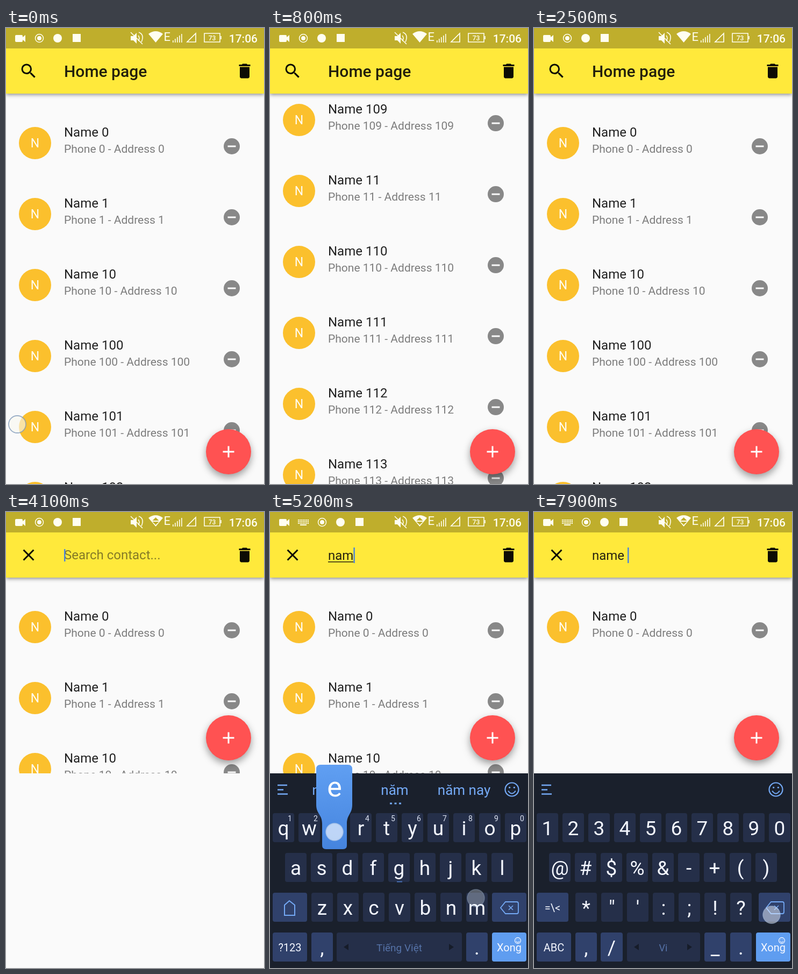
An HTML page with a canvas that plays this animation: 480x848 px, repeating every 8000 ms.

```html
<!DOCTYPE html>
<html lang="vi">
<head>
<meta charset="utf-8">
<title>Contact list search</title>
<style>
html, body { margin: 0; width: 100%; height: 100%; overflow: hidden; background: #fafafa; }
canvas { display: block; }
</style>
</head>
<body>
<canvas id="stage" width="480" height="848"></canvas>
<script>
const LOOP = 8000, TOP = 122, KEYBOARD_TOP = 486;
const c = document.getElementById('stage').getContext('2d');
const BLUE = '#74a9f5', KEY = '#252f49', DARK_KEY = '#30416b';

const ICONS = {
  search: 'M15.5 14h-.79l-.28-.27A6.47 6.47 0 0 0 16 9.5 6.5 6.5 0 1 0 9.5 16c1.61 0 3.09-.59 4.23-1.57l.27.28v.79l5 4.99L20.49 19zm-6 0a4.5 4.5 0 1 1 0-9 4.5 4.5 0 0 1 0 9z',
  close: 'M19 6.41L17.59 5 12 10.59 6.41 5 5 6.41 10.59 12 5 17.59 6.41 19 12 13.41 17.59 19 19 17.59 13.41 12z',
  trash: 'M6 19c0 1.1.9 2 2 2h8c1.1 0 2-.9 2-2V7H6zM19 4h-3.5l-1-1h-5l-1 1H5v2h14z'
};

// Taps: press, release, x, y, popup label, popup centre
const TAPS = [
  [2560, 2680, 31, 83],
  [4770, 4860, 338, 735, 'n', 337, 735],
  [4910, 5000, 46, 668, 'a', 48, 661],
  [5040, 5130, 383, 718, 'm', 385, 735],
  [5180, 5290, 120, 595, 'e', 120, 587],
  [5590, 5690, 240, 818],
  [5730, 5820, 456, 596, 'p', 456, 587],
  [6290, 6410, 447, 726],
  [6450, 6560, 23, 843],
  [7210, 7310, 456, 596, '0', 456, 587],
  [7780, 7890, 442, 749]
];
const TYPED = [[0, ''], [4860, 'n'], [5000, 'na'], [5130, 'nam'], [5290, 'name'], [5690, 'name '],
  [5820, 'name p'], [6410, 'name '], [7310, 'name 0'], [7890, 'name ']];
const SUGGESTIONS = { n: 'nó|nhé|này', na: 'na|nay|nào', nam: 'nam|năm|năm nay', name: 'name|names|named' };

// Contacts sorted as strings: 0, 1, 10, 100 … 109, 11, 110 …
const contacts = Array.from({ length: 200 }, (_, i) => String(i)).sort();

const clamp = v => Math.max(0, Math.min(1, v));

function text(s, x, y, size, color, align = 'left', weight = 400) {
  c.font = `${weight} ${size}px Roboto, sans-serif`;
  c.textAlign = align;
  c.fillStyle = color;
  c.fillText(s, x, y);
}
function rect(x, y, w, h, color) { c.fillStyle = color; c.fillRect(x, y, w, h); }
function disc(x, y, r, color) {
  c.fillStyle = color;
  c.beginPath(); c.arc(x, y, r, 0, 7); c.fill();
}
function box(x, y, w, h, r, color) {
  c.fillStyle = color;
  c.beginPath(); c.roundRect(x, y, w, h, r); c.fill();
}
function fill(d, color) { c.fillStyle = color; c.fill(new Path2D(d)); }
function line(d, color, width) {
  c.strokeStyle = color; c.lineWidth = width;
  c.stroke(new Path2D(d));
}
function withShadow(blur, dy, alpha, draw) {
  c.save();
  c.shadowColor = `rgba(0,0,0,${alpha})`; c.shadowBlur = blur; c.shadowOffsetY = dy;
  draw();
  c.restore();
}
function icon(name, x, y) {
  c.save();
  c.translate(x, y); c.scale(1.5, 1.5);
  fill(ICONS[name], '#0c0c04');
  c.restore();
}

function scrollAt(t) {
  if (t < 1000) return 2158 * (1 - Math.exp(-Math.max(0, t - 100) / 500));
  if (t < 1500) {
    const u = (t - 1000) / 500;
    return 1801 * (1 - 2.59 * u * u + 1.59 * u ** 3);
  }
  const s = t - 1500;
  return t < 2500 ? -1.49 * s * Math.exp(-s / 130) : 0;
}

function drawList(t) {
  const bottom = t < 3700 ? 848 : KEYBOARD_TOP;
  const count = t < 5850 ? contacts.length : t < 7330 ? 0 : 1;
  const scroll = scrollAt(t);
  c.save();
  c.beginPath(); c.rect(0, TOP, 480, bottom - TOP); c.clip();
  for (let i = 0; i < count; i++) {
    const y = 214 + i * 132 - scroll, id = contacts[i];
    if (y < 60 || y > 900) continue;
    disc(54, y, 30, '#fbc02d');
    text('N', 54, y + 8, 23, '#fffdf5', 'center');
    text('Name ' + id, 108, y - 12, 24, '#212121');
    text(`Phone ${id} - Address ${id}`, 108, y + 18, 21, '#7c7c7c');
    disc(420, y + 6, 15, '#888');
    rect(412.5, y + 4.5, 15, 3, '#fafafa');
  }
  c.restore();
}

function drawFab(t) {
  const y = t < 3700 ? 788 : 420;
  withShadow(14, 6, 0.38, () => disc(414, y, 42, '#ff5252'));
  line(`M403.5 ${y}h21M414 ${y - 10.5}v21`, '#fff', 3);
}

function drawStatus(t) {
  const ink = '#fffef0', shift = t < 4300 ? 0 : 35;
  rect(0, 0, 480, 38, '#bfae2c');
  box(17, 13, 14, 13, 2, ink);
  fill('M30 18l6-5v13l-6-5z', ink);
  if (shift) {
    for (let i = 0; i < 21; i++) rect(52 + i % 7 * 3, 14 + (i / 7 | 0) * 3, 2, 2, ink);
    rect(56, 23, 12, 2, ink);
  }
  c.save();
  c.translate(shift, 0);
  disc(62, 19, 4, ink);
  line('M54.5 19a7.5 7.5 0 1 0 15 0a7.5 7.5 0 1 0-15 0', ink, 1.5);
  disc(96, 19, 8, ink);
  rect(124, 11, 15, 15, ink);
  c.restore();

  fill('M232 15h5l6-6v20l-6-6h-5z', ink);
  line('M232 8L254 30M246 14q4 5 0 10M247 8q11 4 5 18', ink, 1.6);
  fill('M265 11Q278.500 1 292 11L278.500 27z', ink);
  if (t >= 3400) {
    fill('M278.500 10l6 6h-12zM272.500 18h12l-6 6z', '#bfae2c');
  }
  text('E', 293.5, 24, 22, ink);
  for (let i = 0; i < 5; i++) rect(310 + i * 4, 23 - i * 3, 1.6, 4 + i * 3, ink);
  line('M337 26H353V10z', ink, 1.7);
  line('M369 10h29v16h-29zM400 15v6', ink, 1.6);
  text('73', 383.5, 22.5, 12, ink, 'center', 500);
  text('17:06', 468, 27, 21, ink, 'right', 500);
}

function drawHeader(t, query) {
  withShadow(7, 2, 0.45, () => rect(0, 30, 480, TOP - 30, '#ffe93b'));
  drawStatus(t);
  const searching = t >= 2750;
  icon(searching ? 'close' : 'search', 24, 62);
  icon('trash', 426, 62);
  if (!searching) return text('Home page', 108, 91, 30, '#221f0c', 'left', 500);
  if (!query) text('Search contact...', 108, 88, 24, '#857a26');
  text(query, 108, 89, 24, '#26230f');
  const width = c.measureText(query).width;
  if (query && !query.includes(' ')) rect(108, 92, width, 1.5, '#26230f');
  rect(108 + width, query ? 66 : 69, 2.5, query ? 29 : 23, '#4f86d8');
}

function smiley(x, y, r, color, width) {
  line(`M${x - r} ${y}a${r} ${r} 0 1 0 ${2 * r} 0a${r} ${r} 0 1 0 ${-2 * r} 0M${x - r * .55} ${y + r * .2}q${r * .55} ${r * .8} ${r * 1.1} 0`, color, width);
  disc(x - r * .35, y - r * .3, r * .13, color);
  disc(x + r * .35, y - r * .3, r * .13, color);
}

function key(x, y, w, label, size = 37, color = KEY) {
  box(x, y, w, 54, 4, color);
  text(label, x + w / 2, y + (size > 30 ? 41 : 35), size, '#f4f7ff', 'center');
}
function keyRow(labels, x, y) {
  [...labels].forEach((label, i) => key(x + i * 48, y, 40, label));
}

function drawKeyboard(t, query) {
  const rise = clamp((t - 4150) / 250);
  if (!rise) return;
  const symbols = t >= 6560;
  c.save();
  c.translate(0, 362 * (1 - rise) ** 2);
  rect(0, KEYBOARD_TOP, 480, 362, '#1a202c');

  line('M14 508h18M14 516.500h11M14 524.500h19', BLUE, 2.6);
  smiley(450, 516, 12.5, BLUE, 2.2);
  const words = SUGGESTIONS[query];
  if (words) {
    words.split('|').forEach((word, i) => text(word, [104, 232, 361][i], 526, 26, BLUE, 'center'));
    for (const x of [225, 233.5, 242]) rect(x - 2, 540.5, 4, 3, BLUE);
  }

  keyRow(symbols ? '1234567890' : 'qwertyuiop', 5, 560);
  keyRow(symbols ? '@#$%&-+()' : 'asdfghjkl', 28, 634);
  keyRow(symbols ? '*"\':;!?' : 'zxcvbnm', 77, 708);
  if (!symbols) {
    for (let i = 0; i < 10; i++) text((i + 1) % 10, 37 + i * 48, 575, 14, '#dfe5f4', 'center');
    rect(236, 686.5, 10, 2, '#4770b5');
  }

  if (symbols) key(5, 708, 59, '=\\<', 20, DARK_KEY);
  else {
    box(5, 708, 64, 54, 4, DARK_KEY);
    line('M27 750V731L36 723L46 731V750z', BLUE, 2);
  }
  box(symbols ? 418 : 413, 708, symbols ? 59 : 64, 54, 4, DARK_KEY);
  const nudge = symbols ? 3 : 0;
  line(`M${429 + nudge} 736l9-11h21q3 0 3 3v16q0 3-3 3h-21z`, BLUE, 1.8);
  line(`M${444 + nudge} 732l8 8m0-8l-8 8`, BLUE, 1.6);

  key(5, 782, 64, symbols ? 'ABC' : '?123', 20, DARK_KEY);
  key(77, 782, 40, ',', 37, DARK_KEY);
  if (symbols) {
    key(124, 782, 41, '/', 37, DARK_KEY);
    key(317, 782, 40, '_', 37, DARK_KEY);
  }
  key(365, 782, 40, '.', 37, DARK_KEY);
  const left = symbols ? 173 : 124, right = symbols ? 309 : 357;
  box(left, 782, right - left, 54, 4, KEY);
  text(symbols ? 'Vi' : 'Tiếng Việt', 240.5, 817, symbols ? 18 : 19, '#5673a8', 'center');
  fill(`M${left + 13} 809l9-6v12zM${right - 15} 809l-9-6v12z`, '#161c29');
  key(413, 782, 64, 'Xong', 20, '#5f9df0');
  smiley(461, 797, 5.5, '#f4f7ff', 1.3);
  c.restore();
}

function drawPopup(label, x, y) {
  const shade = c.createLinearGradient(0, y - 117, 0, y + 40);
  shade.addColorStop(0, '#609ff2');
  shade.addColorStop(1, '#4584de');
  fill(`M${x - 26} ${y - 117}h51q8 0 8 8v66c0 18-10 18-10 36v40q0 7-7 7h-32q-7 0-7-7v-40c0-18-11-18-11-36v-66q0-8 8-8z`, shade);
  text(label, x, y - 58, 52, '#fff', 'center');
}

function drawTouch(x, y, alpha, onKeyboard) {
  c.save();
  c.globalAlpha = alpha;
  disc(x, y, 16.5, onKeyboard ? 'rgba(235,243,255,.72)' : 'rgba(248,248,240,.62)');
  c.strokeStyle = onKeyboard ? 'rgba(150,180,220,.45)' : 'rgba(105,135,175,.65)';
  c.lineWidth = 1.8;
  c.beginPath(); c.arc(x, y, 16, 0, 7); c.stroke();
  c.restore();
}

function drawTouches(t) {
  if (t < 250) drawTouch(21, 737 - scrollAt(t), 1);
  if (t >= 1000 && t < 1150) drawTouch(27, 250 + 1801 - scrollAt(t), 1);
  for (const [press, release, x, y, label, keyX, keyY] of TAPS) {
    if (t < press || t > release + 160) continue;
    if (label && t < release) drawPopup(label, keyX, keyY);
    const alpha = t < release ? 1 : 0.75 * (1 - (t - release) / 160);
    drawTouch(x, y, alpha, y > KEYBOARD_TOP);
  }
}

function draw(t) {
  const query = TYPED.findLast(([at]) => at <= t)[1];
  rect(0, 0, 480, 848, '#fafafa');
  drawList(t);
  drawFab(t);
  drawHeader(t, query);
  drawKeyboard(t, query);
  drawTouches(t);
}

const start = performance.now();
function frame() {
  draw((performance.now() - start) % LOOP);
  requestAnimationFrame(frame);
}
frame();
</script>
</body>
</html>
```
